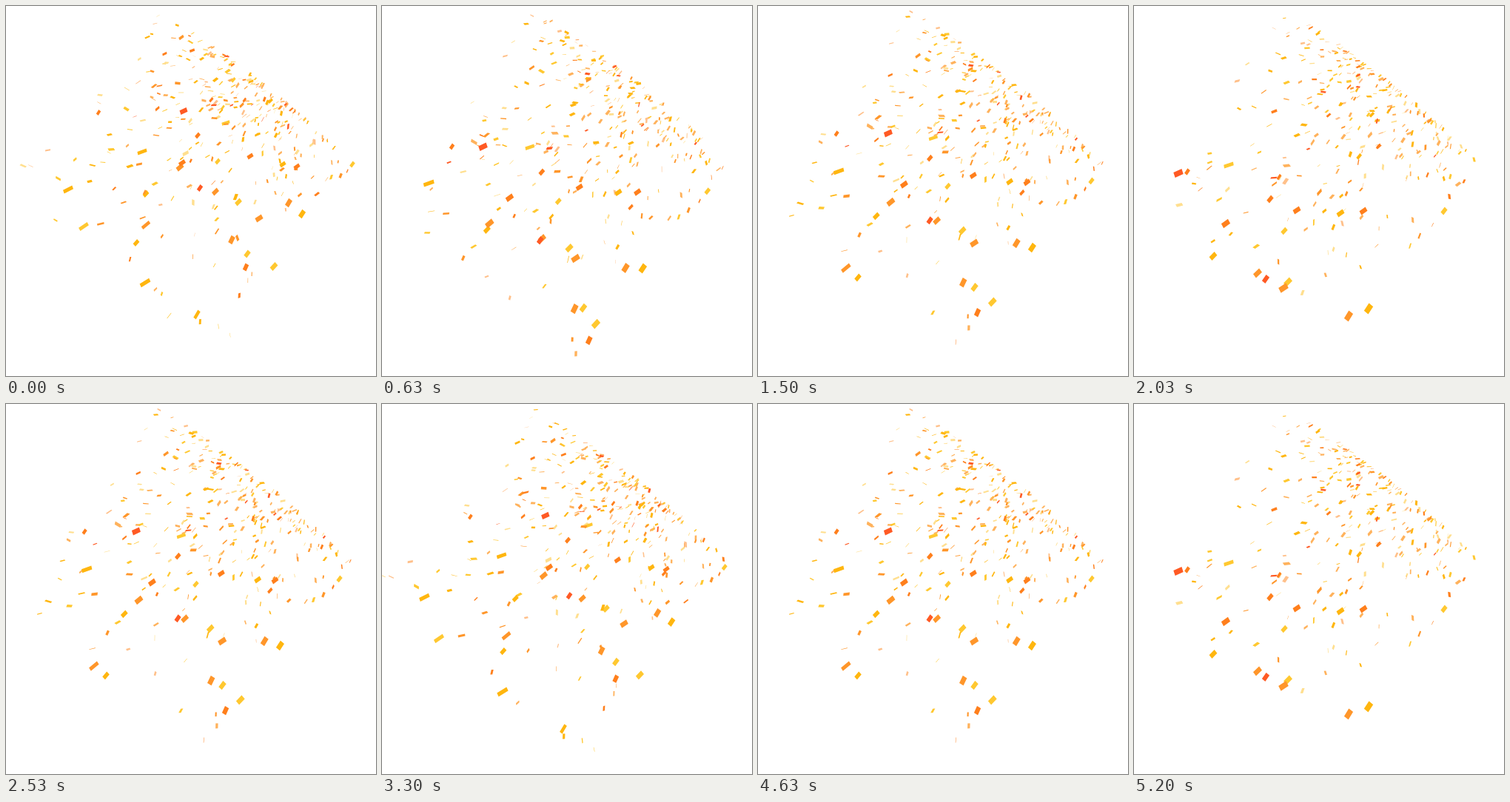
An HTML page for the animation above (5.23 s loop, 500 by 500 pixels).

```html
<!DOCTYPE html>
<html lang="en">
<head>
<meta charset="utf-8">
<title>Confetti</title>
<style>
  html, body { margin: 0; width: 100%; height: 100%; overflow: hidden; background: #fff; }
  svg { display: block; width: 100%; height: 100%; }
</style>
</head>
<body>
<svg id="stage" viewBox="0 0 500 500"></svg>
<script>
const LOOP = 5230, STEPS = 15;
const COLORS = {
  peach: "#ffc08a", cream: "#ffdf8f", sand: "#ffb25c", yellow: "#ffc830",
  amber: "#ffb60f", orange: "#ff962a", deep: "#ff7f1c", red: "#ff5a24"
};

// Large pieces: start x, y, travel over 14 steps, length
const LARGE = [
  ["orange", 283, 251, -116, 110, 10],
  ["deep", 330, 203, -110, 73, 9],
  ["orange", 189, 296, -197, 163, 14],
  ["yellow", 314, 265, -106, 108, 10],
  ["yellow", 326, 335, -94, 127, 10],
  ["yellow", 362, 352, -127, 135, 11],
  ["orange", 382, 266, -92, 153, 11],
  ["amber", 400, 281, -83, 128, 11],
  ["deep", 393, 217, -83, 60, 9],
  ["amber", 374, 214, -95, 66, 9],
  ["yellow", 297, 158, -169, 57, 12],
  ["red", 240, 142, -180, 84, 11],
  ["amber", 184, 197, -210, 74, 14],
  ["yellow", 468, 214, -49, 63, 8],
  ["deep", 125, 144, -53, 80, 7],
  ["orange", 342, 287, -140, 94, 11],
  ["red", 262, 246, -84, 123, 9],
  ["amber", 189, 254, -82, 84, 9],
  ["deep", 259, 175, -75, 86, 8],
  ["yellow", 286, 210, -83, 94, 8],
  ["deep", 238, 212, -114, 82, 10],
  ["orange", 235, 218, -156, 132, 11],
  ["orange", 305, 316, -78, 162, 11],
  ["deep", 324, 353, -77, 172, 10],
  ["amber", 176, 320, -115, 132, 9],
  ["amber", 84, 248, -250, 125, 15],
  ["amber", 188, 374, -235, 141, 16],
  ["amber", 258, 417, -122, 207, 13],
  ["yellow", 105, 298, -263, 178, 15]
];

let seed = 2024;
function random() {
  seed = (seed * 1664525 + 1013904223) % 4294967296;
  return seed / 4294967296;
}
const between = (a, b) => a + (b - a) * random();
const clamp = v => Math.min(1, Math.max(0, v));
const rad = deg => deg * Math.PI / 180;

function pickColor() {
  const names = ["amber", "orange", "yellow", "amber", "orange", "deep",
    "sand", "amber", "yellow", "sand", "peach", "cream"];
  return random() < 0.03 ? "red" : names[Math.floor(random() * names.length)];
}

const travel = step => step * (1 + 0.03 * step) / (14 * 1.42);

function largePiece([color, x, y, dx, dy, length]) {
  const angle = Math.atan2(dy, dx);
  const ratio = length > 11 ? 0.36 : 0.6;
  return { color, at(step) {
    const k = travel(step), w = length * (0.92 + 0.014 * step);
    return { x: x + dx * k, y: y + dy * k, w, h: w * ratio, angle, skew: 0.12 };
  } };
}

// Small pieces are born on the far diagonal edge, speed up as they come nearer
// and vanish at the end of their life.
function smallPiece() {
  const u = random() < 0.35 ? random() : 0.06 + (random() + random()) / 2 * 0.94;
  const edgeX = 205 + 265 * u, edgeY = 6 + 209 * u - 52 * u * (1 - u);
  const spread = 4 * u * (1 - u);
  const heading = rad(between(126 - 9 * spread, 128 + 24 * spread));
  const birth = between(-0.33, 1), life = 0.28 + 0.8 * Math.pow(random(), 2);
  const length = between(4.5, 8.5), jitter = between(-38, 38);
  const tumble = between(0, 6.28), rate = between(0.05, 0.25), skew = between(-0.6, 0.6);
  return { color: pickColor(), at(step) {
    const age = birth + 0.33 * step / 14;
    if (age < 0 || age > life) return null;
    const d = 390 * Math.pow(age, 1.65);
    const x = edgeX + Math.cos(heading) * d, y = edgeY + Math.sin(heading) * d;
    const w = length * (0.8 + 0.4 * age);
    const h = w * 0.5 * Math.max(0.16, Math.abs(Math.cos(tumble + rate * step)));
    const angle = rad(175 - 70 * clamp((x + y - 350) / 250) + jitter);
    return { x, y, w, h, angle, skew };
  } };
}

const pieces = [...LARGE.map(largePiece), ...Array.from({ length: 720 }, smallPiece)];

const paths = {};
for (const name in COLORS) {
  const path = document.createElementNS("http://www.w3.org/2000/svg", "path");
  path.setAttribute("fill", COLORS[name]);
  document.getElementById("stage").append(path);
  paths[name] = path;
}

function outline({ x, y, w, h, angle, skew }) {
  const side = angle + Math.PI / 2 + skew;
  const ax = Math.cos(angle) * w / 2, ay = Math.sin(angle) * w / 2;
  const bx = Math.cos(side) * h / 2, by = Math.sin(side) * h / 2;
  const corner = (i, j) => (x + i * ax + j * bx).toFixed(1) + " " + (y + i * ay + j * by).toFixed(1);
  return `M${corner(1, 1)}L${corner(-1, 1)}L${corner(-1, -1)}L${corner(1, -1)}Z`;
}

function draw(step) {
  const data = {};
  for (const piece of pieces) {
    const pose = piece.at(step);
    // Nothing is seen past the near diagonal edge.
    if (!pose || pose.y - 0.84 * pose.x > 262) continue;
    data[piece.color] = (data[piece.color] || "") + outline(pose);
  }
  for (const name in paths) paths[name].setAttribute("d", data[name] || "");
}

// Ten pictures take 700 ms; the first of each ten is held for 100 ms.
function stepAt(ms) {
  const rest = ms % 700;
  const index = rest < 100 ? 0 : 1 + Math.floor((rest - 100) / (600 / 9));
  return (10 * Math.floor(ms / 700) + index) % STEPS;
}

const start = performance.now();
let shown = -1;
function tick() {
  // Picture times are rounded to 10 ms, so lead by a few.
  const step = stepAt((performance.now() - start + 4) % LOOP);
  if (step !== shown) draw(shown = step);
  requestAnimationFrame(tick);
}
tick();
</script>
</body>
</html>
```
